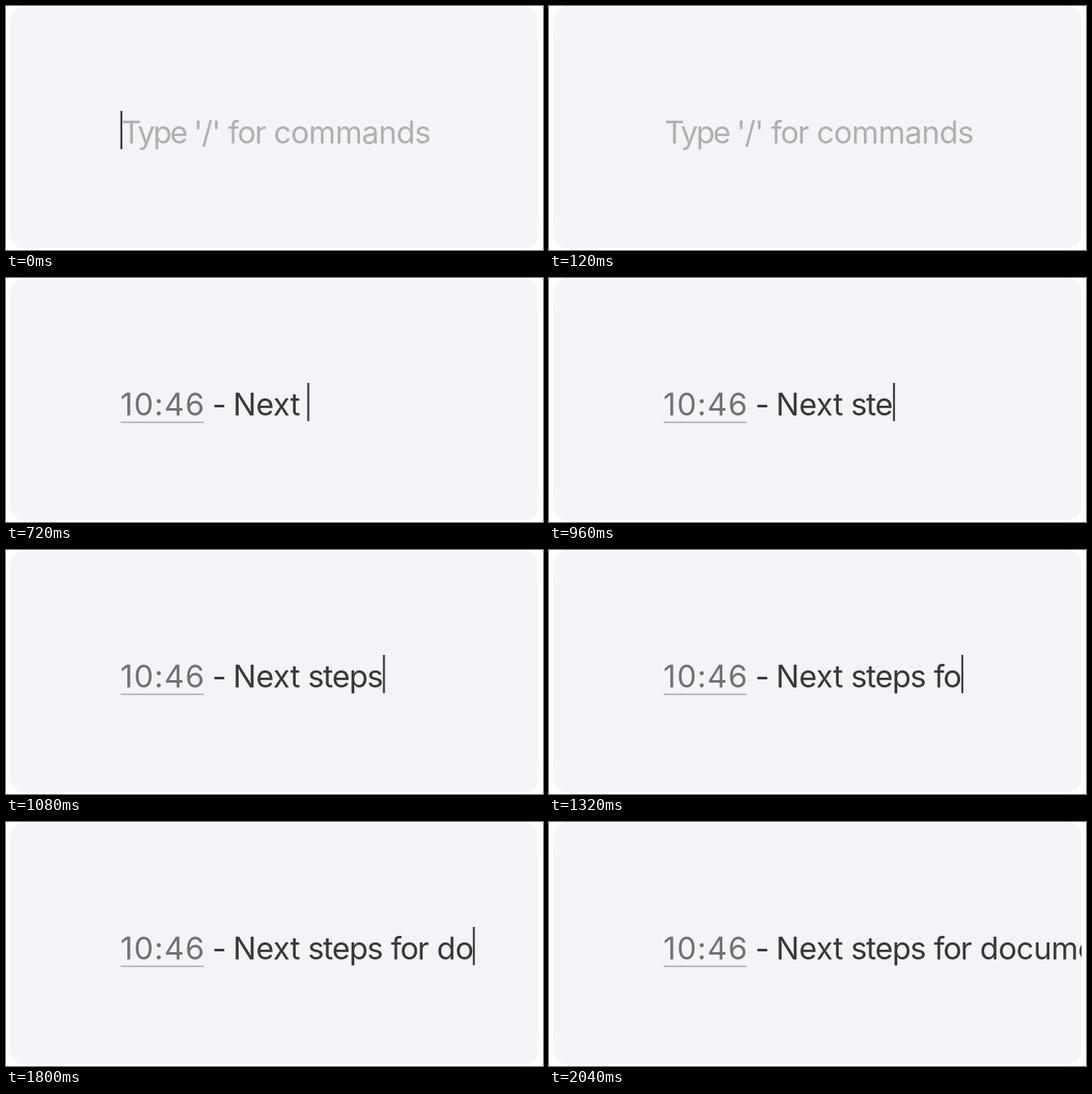
An HTML page that plays this animation: 660x300 px, repeating every 2.52 s.

```html
<!DOCTYPE html>
<html lang="en">
<head>
<meta charset="utf-8">
<title>Typing</title>
<style>
  html, body { margin: 0; width: 100%; height: 100%; overflow: hidden; background: #fff; }
  svg { display: block; width: 660px; height: 300px; }
  text { font: 400 38px Inter, "Liberation Sans", sans-serif; white-space: pre; }
  #hint { fill: #b0b0b2; }
  #time { fill: #727274; letter-spacing: 1.2px; }
  #note { fill: #38383a; }
</style>
</head>
<body>
<svg viewBox="0 0 660 300">
  <defs>
    <clipPath id="card"><rect x="5" y="1" width="649.5" height="297" rx="18"/></clipPath>
  </defs>
  <g clip-path="url(#card)">
    <rect width="660" height="300" fill="#f4f4f9"/>
    <rect x="5" y="40" width="649.5" height="220" rx="8" fill="#f3f3f8"/>
    <g id="hint"></g>
    <g id="typed">
      <text id="time" x="140.5" y="169">10:46</text>
      <rect x="141" y="176.6" width="102" height="1.7" fill="#acacb0"/>
      <g id="note"></g>
    </g>
    <rect id="caret" y="129" width="2.4" height="47"/>
  </g>
</svg>
<script>
const LOOP = 2520, STEP = 120, FIRST = 3;
const $ = id => document.getElementById(id);

// Each word: left edge, text, letter spacing.
const hintWords = [[142, "Type", -2.4], [230.5, "'/'", -1.4], [273, "for", -1.5], [329, "commands", -0.7]];
const noteWords = [[279, "Next ", -0.4], [371, "steps ", -1.2], [473, "for ", -1.5], [529.5, "document", -0.6]];

// Typed length and caret position, one entry per step.
const keys = [
  [1, 308.5], [2, 330], [4, 361], [5, 371.5], [6, 388.5],
  [8, 424], [10, 464.5], [11, 473], [13, 508], [14, 520.5],
  [15, 529.5], [16, 552], [17, 575], [19, 621], [21, 680]
];

function addWord(parent, [x, str, gap]) {
  const el = document.createElementNS("http://www.w3.org/2000/svg", "text");
  el.setAttribute("x", x);
  el.setAttribute("y", 169);
  el.style.letterSpacing = gap + "px";
  el.textContent = str;
  parent.appendChild(el);
  return el;
}

function setCaret(x, color) {
  $("caret").setAttribute("x", x - 1.2);
  $("caret").setAttribute("fill", color);
}

hintWords.forEach(w => addWord($("hint"), w));
addWord($("note"), [253.5, "-", 0]);
const noteEls = noteWords.map(w => addWord($("note"), w));

function draw(t) {
  const slot = Math.floor(t / STEP);
  const typing = slot >= FIRST;
  $("hint").style.display = typing ? "none" : "";
  $("typed").style.display = typing ? "" : "none";
  if (!typing) return setCaret(141.8, slot ? "none" : "#3a3a3c");

  const [count, x] = keys[Math.min(slot - FIRST, keys.length - 1)];
  let left = count;
  noteWords.forEach(([, str], i) => {
    noteEls[i].textContent = str.slice(0, Math.max(0, left));
    left -= str.length;
  });
  setCaret(x, slot === FIRST ? "#858588" : "#3a3a3c");
}

const start = performance.now();
let last = -1;
function tick() {
  const t = (performance.now() - start) % LOOP;
  const slot = Math.floor(t / STEP);
  if (slot !== last) draw(t);
  last = slot;
  requestAnimationFrame(tick);
}
tick();
</script>
</body>
</html>
```
